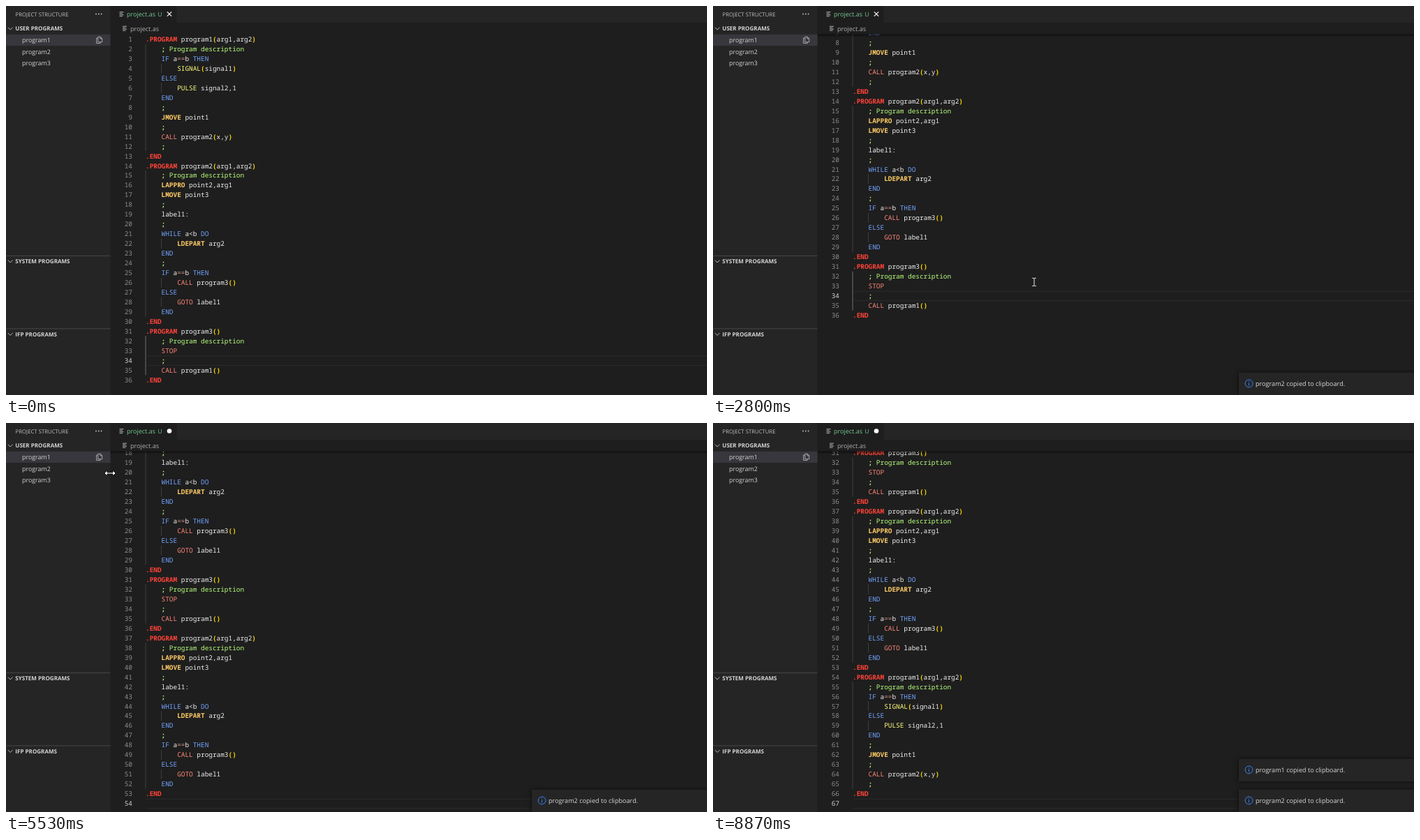
Animation, 1004 px wide and 558 px high, one loop 9.19 s. Source, as an HTML page with a canvas:

```html
<!DOCTYPE html>
<html lang="en">
<head>
<meta charset="utf-8">
<style>
html, body { margin: 0; width: 100%; height: 100%; overflow: hidden; background: #1e1e1e; }
canvas { display: block; }
</style>
</head>
<body>
<canvas id="stage" width="1004" height="558"></canvas>
<script>
const ctx = document.getElementById('stage').getContext('2d');
const LOOP = 9190, FRAME = 200 / 3, BLINK = 510;
const LINE = 13.97, CHAR = 5.643, LEFT = 200, TOP = 47.5;
const LAST_ROW = 545.8, WHEEL = 46.4, SIDEBAR = 149.5;
const MONO = '9.41px "Noto Sans Mono", monospace';
const UI = '"Open Sans", "Noto Sans", sans-serif';

const program1 = `.PROGRAM program1(arg1,arg2)
    ; Program description
    IF a==b THEN
        SIGNAL(signal1)
    ELSE
        PULSE signal2,1
    END
    ;
    JMOVE point1
    ;
    CALL program2(x,y)
    ;
.END`.split('\n');
const program2 = `.PROGRAM program2(arg1,arg2)
    ; Program description
    LAPPRO point2,arg1
    LMOVE point3
    ;
    label1:
    ;
    WHILE a<b DO
        LDEPART arg2
    END
    ;
    IF a==b THEN
        CALL program3()
    ELSE
        GOTO label1
    END
.END`.split('\n');
const program3 = `.PROGRAM program3()
    ; Program description
    STOP
    ;
    CALL program1()
.END`.split('\n');

// Each click or edit puts the caret at the end of its active line, by default the last
const base = [...program1, ...program2, ...program3];
const edits = [
  { at: 2050, lines: base, active: 34 },
  { at: 3620, lines: base },
  { at: 4260, lines: [...base, ''] },
  { at: 4560, lines: [...base, ...program2, ''], pasted: true },
  { at: 7310, lines: [...base, ...program2, ...program1, ''], pasted: true }
];
const wheelTicks = [2600, 2730, 3000, 6600];

// Pointer stops: time, x, y; the pointer is hidden outside each visit
const visits = [
  [[70, 118, 518], [730, 132, 68], [1130, 134, 70], [1870, 327, 245], [2200, 446, 305],
   [2500, 822, 480], [2800, 460, 396], [3470, 294, 430], [4270, 281, 414]],
  [[5330, 281, 414], [5530, 149, 72], [5930, 133, 49], [6270, 135, 46], [6730, 343, 405], [7200, 289, 453]],
  [[8270, 289, 453], [8530, 262, 486]]
];

const rules = [
  [/^;/, '#b8ff7c', 'bold'],
  [/^Program description/, '#b8ff7c'],
  [/^\.(PROGRAM|END)/, '#ff4338', 'bold'],
  [/^(IF|THEN|ELSE|END|WHILE|DO)\b/, '#72a4ff'],
  [/^(CALL|GOTO|STOP)\b/, '#ff8678'],
  [/^(SIGNAL|PULSE)\b/, '#ffff80'],
  [/^(JMOVE|LMOVE|LAPPRO|LDEPART)\b/, '#ffcc66', 'bold'],
  [/^[()]/, '#ffd700', 'bold'],
  [/^==/, '#d08a80'],
  [/^([a-z0-9,:<]+|\s+)/, '#eee']
];

const clamp = v => Math.max(0, Math.min(1, v));
const easeInOut = k => k * k * (3 - 2 * k);

function rect(x, y, w, h, color) {
  ctx.fillStyle = color;
  ctx.fillRect(x, y, w, h);
}

function text(str, x, y, color, font, align = 'left') {
  ctx.font = font;
  ctx.fillStyle = color;
  ctx.textAlign = align;
  ctx.fillText(str, x, y);
}

function icon(d, x, y, stroke, width = 0.9, fill = 'transparent') {
  const shape = new Path2D(d);
  ctx.save();
  ctx.translate(x, y);
  ctx.fillStyle = fill;
  ctx.fill(shape);
  ctx.strokeStyle = stroke;
  ctx.lineWidth = width;
  ctx.stroke(shape);
  ctx.restore();
}

function dot(x, y, r, color) {
  ctx.beginPath();
  ctx.arc(x, y, r, 0, Math.PI * 2);
  ctx.fillStyle = color;
  ctx.fill();
}

const chevron = (x, y, color) => icon('M-3.4-1.7L0 1.8 3.4-1.7', x, y, color);
const fileIcon = (x, y) => icon('M0 0h6M0 2h4.5M0 4h6M0 6h4.5', x, y, '#c0c0c0');
const copyIcon = (x, y) =>
  icon('M-2-3h-2v7.5h5.5v-1.7M-1.8-4.8h3.4l2.5 2.5v5h-5.9zM1.4-4.8v2.7h2.7', x, y, '#c5c5c5', 0.8);

function codeLine(line, y) {
  for (let col = 0; col < line.length;) {
    const rest = line.slice(col);
    const [pattern, color, weight = '500'] = rules.find(rule => rule[0].test(rest));
    const token = rest.match(pattern)[0];
    if (token.trim()) text(token, LEFT + col * CHAR, y + 3.4, color, `${weight} ${MONO}`);
    col += token.length;
  }
}

function scrollAt(t) {
  const paste = edits.findLast(edit => edit.pasted && edit.at <= t);
  const ticks = wheelTicks.filter(at => at <= t && at > (paste?.at ?? 0)).length;
  const reveal = paste ? TOP + (paste.lines.length - 1) * LINE - LAST_ROW : 0;
  return reveal + ticks * WHEEL;
}

function drawEditor(t) {
  const focus = edits.findLast(edit => edit.at <= t);
  const { lines, active = lines.length } = focus ?? edits[0];
  const scroll = scrollAt(t);
  const rowY = n => TOP + (n - 1) * LINE - scroll;
  const foldAlpha = 0.75 * clamp((t - 1470) / 130) * clamp((2130 - t) / 430);
  const highlightWords = t >= 3930 && t < edits[2].at;

  ctx.save();
  ctx.beginPath();
  ctx.rect(150, 40.5, 854, 518);
  ctx.clip();

  const activeY = rowY(active);
  for (const edge of [-7, 6.5]) rect(LEFT, activeY + edge, 804, 1, '#2b2b2b');

  lines.forEach((line, i) => {
    const n = i + 1, y = rowY(n);
    if (y < 30 || y > 570) return;
    const indent = line.search(/\S/);
    for (let level = 0; level < indent; level += 4) {
      const lit = level === 0 && n > 31 && n < 36 && lines === base;
      rect(LEFT - 0.5 + level * CHAR, y - 7, 1, LINE, lit ? '#707070' : '#404040');
    }
    const word = line.indexOf('END');
    if (highlightWords && word >= 0) rect(LEFT + word * CHAR, y - 7, 3 * CHAR, LINE, 'rgba(87,87,87,.72)');
    text(n, 181, y + 3.4, n === active ? '#d0d0d0' : '#8c8c8c', MONO, 'right');
    codeLine(line, y);
    if (foldAlpha && /PROGRAM |IF|ELSE|WHILE/.test(line)) chevron(192, y, `rgba(197,197,197,${foldAlpha})`);
  });

  if (focus && Math.floor((t - focus.at) / BLINK) % 2 === 0) {
    rect(LEFT - 0.5 + lines[active - 1].length * CHAR, activeY - 7, 1.4, LINE, '#d0d0d0');
  }
  if (scroll) {
    const shadow = ctx.createLinearGradient(0, 40, 0, 44.5);
    shadow.addColorStop(0, 'rgba(0,0,0,.6)');
    shadow.addColorStop(1, 'rgba(0,0,0,0)');
    rect(150, 40, 854, 5, shadow);
  }
  ctx.restore();
}

function drawTabs(t) {
  rect(SIDEBAR, 0, 855, 24, '#252526');
  rect(SIDEBAR, 0, 95, 24, '#1e1e1e');
  fileIcon(162.5, 8.7);
  text('project.as', 173, 15.3, '#73c991', `9px ${UI}`);
  text('U', 217.3, 15.3, '#73c991', `8.6px ${UI}`);
  if (t < edits[2].at) icon('M-3.2-3.2l6.4 6.4M3.2-3.2l-6.4 6.4', 234, 11.5, '#fff', 1.2);
  else dot(234, 11.5, 3.3, '#fff');
  fileIcon(167, 29.2);
  text('project.as', 178, 36, '#b0b0b0', `9px ${UI}`);
}

function drawSidebar(mouse) {
  rect(0, 0, SIDEBAR, 558, '#252526');
  text('PROJECT STRUCTURE', 13.6, 14.8, '#c0c0c0', `7.75px ${UI}`);
  for (const x of [129, 132.8, 136.6]) dot(x, 11.5, 0.9, '#c5c5c5');

  [['USER PROGRAMS', 32.3], ['SYSTEM PROGRAMS', 366.2], ['IFP PROGRAMS', 470.7]].forEach(([title, y], i) => {
    if (i) rect(0, y - 8.3, SIDEBAR, 1, '#464647');
    chevron(6.2, y, '#c5c5c5');
    text(title, 13.3, y + 2.9, '#d4d4d4', `bold 8.05px ${UI}`);
  });

  ['program1', 'program2', 'program3'].forEach((name, i) => {
    const y = 49 + i * 16.3, selected = i === 0;
    const hovered = mouse && mouse[0] < 146 && Math.abs(mouse[1] - y) < 8.1;
    if (selected || hovered) {
      rect(0, y - 8.2, SIDEBAR, 16.2, selected ? '#37373d' : '#2a2d2e');
      copyIcon(133.6, y);
    }
    text(name, 23, y + 3.2, '#d4d4d4', `8.9px ${UI}`);
  });
}

function toast(name, y, start, t) {
  const progress = clamp((t - start) / 270);
  if (!progress) return;
  const eased = 1 - (1 - progress) ** 3;
  ctx.save();
  ctx.globalAlpha = eased;
  ctx.translate(0, (1 - eased) * 33);
  ctx.shadowColor = 'rgba(0,0,0,.7)';
  ctx.shadowBlur = 6;
  rect(753, y - 16.2, 260, 32.4, '#252526');
  ctx.shadowBlur = 0;
  icon('M5.4 0a5.4 5.4 0 1 0-10.8 0a5.4 5.4 0 1 0 10.8 0M0-3v1.1M0-.8v3.8', 767.6, y - 0.5, '#3788ff', 1);
  text(`${name} copied to clipboard.`, 777, y + 3.4, '#d8d8d8', `9.1px ${UI}`);
  ctx.restore();
}

function mouseAt(t) {
  const stops = visits.find(visit => t >= visit[0][0] && t < visit.at(-1)[0]);
  if (!stops) return null;
  const next = stops.findIndex(stop => stop[0] > t);
  const [t0, x0, y0] = stops[next - 1], [t1, x1, y1] = stops[next];
  const k = easeInOut((t - t0) / (t1 - t0));
  return [x0 + (x1 - x0) * k, y0 + (y1 - y0) * k];
}

function drawMouse([x, y]) {
  const pointer = d => icon(d, x, y, '#000', 0.8, '#fff');
  if (Math.abs(x - SIDEBAR) < 4) pointer('M-8 0l4-4v3h8v-3l4 4-4 4v-3h-8v3z');
  else if (x > SIDEBAR) icon('M-2.8-5.6h2L0-5l.8-.6h2M0-5V5M-2.8 5.6h2L0 5l.8.6h2', x, y, '#e8e8e8', 1);
  else if (x > 127 && y < 74) pointer('M-1-1q1-2 2 0v5l5 1.5q1 .5 1 2v3l-1.5 4h-6l-4-6q0-2 1.5-1l2 1.5z');
  else pointer('M0 0v12l2.8-2.6 1.8 4 2-.8-1.8-4h3.8z');
}

function draw() {
  // The screen updates 15 times a second, on times rounded to 10 ms
  const now = performance.now() % LOOP;
  const t = Math.round(Math.floor((now + 5) / FRAME) * FRAME / 10) * 10;
  const mouse = mouseAt(t);
  ctx.textRendering = 'geometricPrecision';
  rect(0, 0, 1004, 558, '#1e1e1e');
  drawEditor(t);
  drawTabs(t);
  drawSidebar(mouse);
  toast('program1', 498, 6260, t);
  toast('program2', 542, 1060, t);
  if (mouse) drawMouse(mouse);
  requestAnimationFrame(draw);
}
draw();
</script>
</body>
</html>
```
